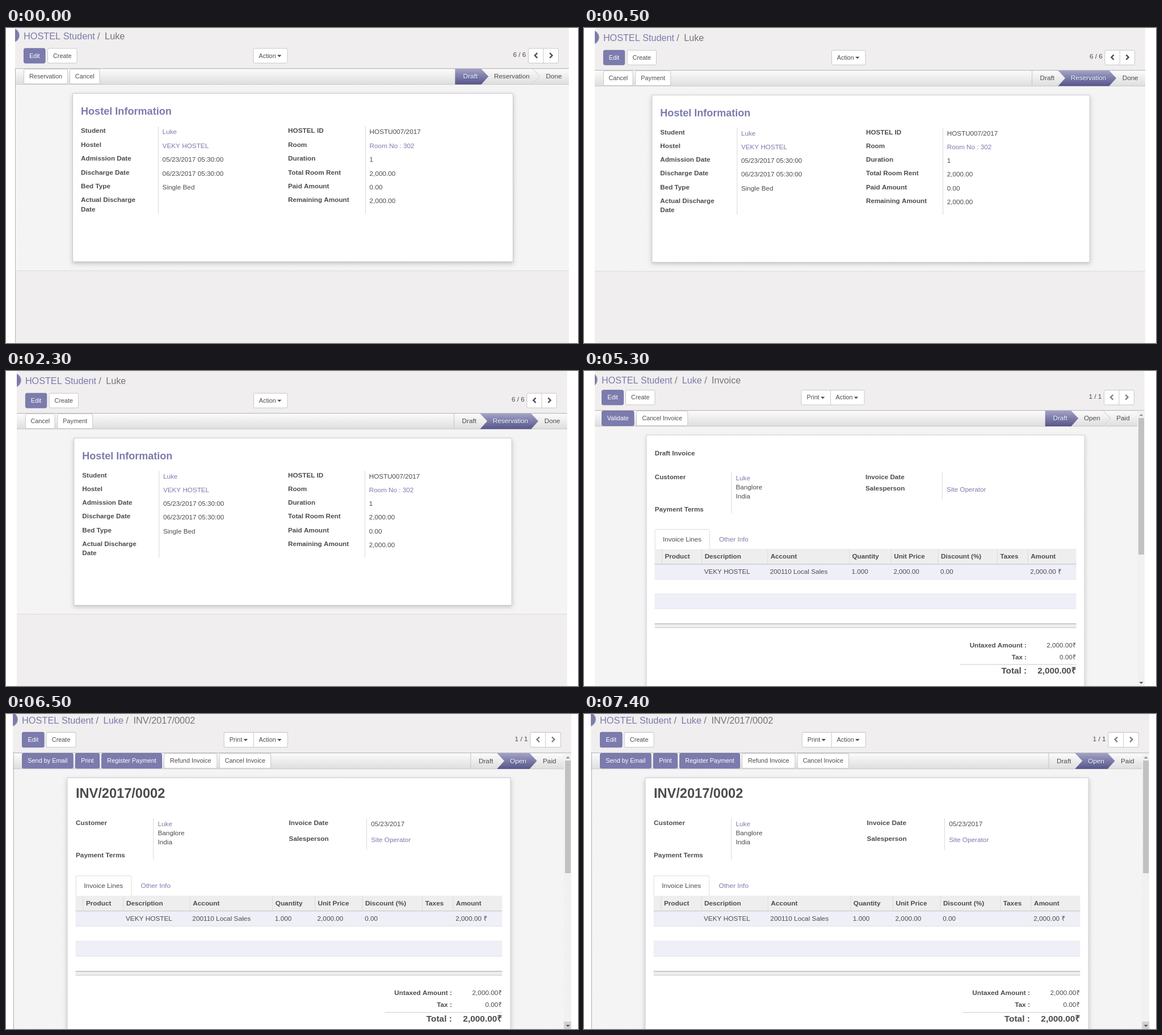
Write an HTML page with a canvas that moves like this. It is 1008 by 556 pixels and loops after 8 s.

```html
<!DOCTYPE html>
<html lang="en">
<head>
<meta charset="utf-8">
<title>Hostel reservation</title>
<style>
  html, body { margin: 0; width: 100%; height: 100%; overflow: hidden; background: #fff; }
  canvas { display: block; }
</style>
</head>
<body>
<canvas id="stage" width="1008" height="556"></canvas>
<script>
const ctx = document.getElementById('stage').getContext('2d');
const INK = '#4c4c4c', PURPLE = '#7c7bad', MUTED = '#777777', PAGE = '#f0eeee', RULE = '#cacaca';
const STUDENT = 'Luke', HOSTEL = 'VEKY HOSTEL', SELLER = 'Site Operator';
let zoom = 0.905; // scale of CSS font sizes on screen

// y is the middle of the capitals
function text(s, x, y, { size = 13, color = INK, bold = false, align = 'left' } = {}) {
  ctx.font = `${bold ? 'bold ' : ''}${size * zoom}px "Liberation Sans", Arial, sans-serif`;
  ctx.textAlign = align;
  ctx.fillStyle = color;
  ctx.fillText(s, x, y + size * zoom * 0.36 - 0.35);
  return ctx.measureText(s).width;
}
const label = (s, x, y) => text(s, x, y, { bold: true });
const link = (s, x, y) => text(s, x, y, { color: PURPLE });

function rect(x, y, w, h, color) {
  ctx.fillStyle = color;
  ctx.fillRect(x, y, w, h);
}

function path(points, close) {
  ctx.beginPath();
  points.forEach(([x, y]) => ctx.lineTo(x, y));
  if (close) ctx.closePath();
}

function stroke(points, color, width = 1) {
  path(points);
  ctx.strokeStyle = color;
  ctx.lineWidth = width;
  ctx.stroke();
}

function fill(points, color) {
  path(points, true);
  ctx.fillStyle = color;
  ctx.fill();
}

function box(x1, y1, x2, y2, color, border, radius = 2.5) {
  ctx.beginPath();
  ctx.roundRect(x1 + 0.5, y1 + 0.5, x2 - x1 - 1, y2 - y1 - 1, radius);
  ctx.fillStyle = color;
  ctx.fill();
  ctx.strokeStyle = border;
  ctx.lineWidth = 1;
  ctx.stroke();
}

function gradient(y, h, top, bottom) {
  const g = ctx.createLinearGradient(0, y, 0, y + h);
  g.addColorStop(0, top);
  g.addColorStop(1, bottom);
  return g;
}

function button(s, x1, x2, y, primary) {
  box(x1, y, x2, y + 27, primary ? PURPLE : '#fff', primary ? '#7371a6' : '#c8c8c8');
  text(s, (x1 + x2) / 2, y + 13.5, { size: 12, color: primary ? '#fff' : INK, align: 'center' });
}

function triangle(x, y, w, h, color) {
  fill([[x - w, y - h], [x + w, y - h], [x, y + h]], color);
}

function menu(s, x, y) {
  const w = text(s, x, y, { size: 12 });
  triangle(x + w + 6, y + 0.5, 3.7, 1.9, INK);
}

function pager(s, x, y, color) {
  text(s, x - 26.5, y + 11.7);
  box(x, y, x + 54, y + 27, '#fff', '#c8c8c8');
  stroke([[x + 27, y], [x + 27, y + 27]], '#c8c8c8');
  for (const [cx, d] of [[x + 14, 1], [x + 40.5, -1]]) {
    const cy = y + 13;
    stroke([[cx + 2.3 * d, cy - 4.3], [cx - 2 * d, cy], [cx + 2.3 * d, cy + 4.3]], color, 2.4);
  }
}

function crumbs(parts, y) {
  let x = 31;
  parts.forEach((s, i) => {
    const last = i === parts.length - 1;
    x += text(s, x, y, { size: 18, color: last ? MUTED : PURPLE }) + 4.3;
    if (!last) x += text('/', x, y, { size: 18, color: MUTED }) + 8.5;
  });
}

function makeHatch() {
  const tile = document.createElement('canvas');
  tile.width = tile.height = 4;
  const c = tile.getContext('2d');
  c.fillStyle = '#fbfbfb';
  c.fillRect(0, 0, 4, 4);
  c.fillStyle = '#eeeeee';
  for (let i = 0; i < 4; i++) {
    c.fillRect(i, i, 1, 1);
    c.fillRect(i, 3 - i, 1, 1);
  }
  const p = ctx.createPattern(tile, 'repeat');
  p.setTransform(new DOMMatrix().scale(0.9));
  return p;
}
const hatch = makeHatch();

// Page ground, collapse knob, header line, status bar and hatched area
function shell(left, right, bar, hatchEnd, titleY, edge) {
  ctx.beginPath();
  ctx.rect(left, -20, right - left, 620);
  ctx.clip();
  rect(left, -20, right - left, 620, PAGE);
  ctx.beginPath();
  ctx.arc(11, titleY - 1.5, 12.5, 0, 7);
  ctx.fillStyle = PURPLE;
  ctx.fill();
  ctx.strokeStyle = '#a9a8c6';
  ctx.lineWidth = 1;
  ctx.stroke();
  rect(left, bar + 28, right - left, hatchEnd - bar - 28, hatch);
  rect(left, bar, right - left, 27.5, gradient(bar, 27.5, '#fcfcfc', '#dedede'));
  rect(left, bar - 0.8, right - left, 1, '#afafb6');
  rect(left, bar + 27, right - left, 1, RULE);
  if (edge) rect(16, bar - 1, 1, 600, '#b4b4b8');
}

function status(items, edges, y, active) {
  const tip = 12.8, h = 27.7, mid = y + 13.5;
  if (active) stroke([[edges[0], y], [edges[0], y + h]], '#c4c4c4');
  items.forEach(([s, x], i) => {
    const a = edges[i], b = edges[i + 1], on = i === active;
    if (on) {
      const shape = [[a, y], [b, y], [b + tip, mid], [b, y + h], [a, y + h]];
      if (i) shape.push([a + tip, mid]);
      fill(shape, gradient(y, h, '#a3a2c6', '#57558a'));
    } else if (b && i + 1 !== active) {
      stroke([[b + 1, y], [b + tip + 1, mid], [b + 1, y + h]], '#fff');
      stroke([[b, y], [b + tip, mid], [b, y + h]], '#c0c0c0');
    }
    if (on) {
      ctx.shadowColor = '#2f4a8a';
      ctx.shadowBlur = 2;
      ctx.shadowOffsetY = 1;
    }
    text(s, x, mid, { color: on ? '#fff' : INK });
    ctx.shadowColor = 'transparent';
  });
}

function sheet(x1, y1, x2, y2) {
  ctx.shadowColor = 'rgba(0,0,0,.2)';
  ctx.shadowBlur = 7;
  ctx.shadowOffsetY = 3;
  rect(x1, y1, x2 - x1, y2 - y1, '#fff');
  ctx.shadowColor = 'transparent';
  box(x1, y1, x2, y2, '#fff', '#c8c8d3', 0);
}

const divider = (x, y1, y2) => rect(x - 0.5, y1, 1, y2 - y1, '#d9d9d9');

function reservation(booked) {
  zoom = 0.905;
  shell(16, 992, 72, 428, 14.5, !booked);
  crumbs(['HOSTEL Student', STUDENT], 14.5);
  button('Edit', 31, 69.5, 35.5, true);
  button('Create', 73, 125.6, 35.5);
  box(435.5, 35.5, 496.5, 62.5, '#fff', '#c8c8c8');
  menu('Action', 445.5, 49);
  pager('6 / 6', 920, 35.5, INK);
  if (booked) {
    button('Cancel', 31, 84, 72);
    button('Payment', 87.5, 151, 72);
  } else {
    button('Reservation', 31, 109, 72);
    button('Cancel', 112, 165.5, 72);
  }
  status([['Draft', 805.5], ['Reservation', 860], ['Done', 951.5]], [791.4, 837.4, 928], 72, booked ? 1 : 0);
  rect(16, 428, 976, 1, '#dcdcdc');
  sheet(117, 115, 894, 413);
  text('Hostel Information', 132, 147, { size: 20, color: PURPLE, bold: true });

  const columns = [
    [132, [['Student', STUDENT, 1], ['Hostel', HOSTEL, 1], ['Admission Date', '05/23/2017 05:30:00'],
      ['Discharge Date', '06/23/2017 05:30:00'], ['Bed Type', 'Single Bed'], ['Actual Discharge', '']]],
    [497, [['HOSTEL ID', 'HOSTU007/2017'], ['Room', 'Room No : 302', 1], ['Duration', '1'],
      ['Total Room Rent', '2,000.00'], ['Paid Amount', '0.00'], ['Remaining Amount', '2,000.00']]]
  ];
  for (const [x, rows] of columns) {
    divider(x + 136.4, 174, 328);
    rows.forEach(([name, value, isLink], i) => {
      const y = 181.5 + i * 24.4;
      label(name, x, y);
      (isLink ? link : text)(value, x + 143.6, y + 2);
    });
  }
  label('Date', 132, 320);
}

function lines(y) {
  // tabs
  rect(125, y, 742.5, 1, '#dddddd');
  box(124.5, y - 35.5, 222, y + 4, '#fff', '#dddddd', 3);
  text('Invoice Lines', 139, y - 17.5);
  link('Other Info', 238, y - 17.5);

  // table
  rect(124.5, y, 743, 27, '#eeeeee');
  const heads = [['Product', 142.5], ['Description', 212.7], ['Account', 328.7], ['Quantity', 472.5],
    ['Unit Price', 546.3], ['Discount (%)', 629], ['Taxes', 733.4], ['Amount', 787.2]];
  for (const [s, x] of heads) {
    rect(x - 5.5, y, 1, 26, '#dcdcdc');
    label(s, x, y + 13);
  }
  rect(124.5, y + 25.8, 743, 1.6, RULE);
  for (let i = 0; i < 4; i++) {
    const top = y + 27.2 + i * 26.2;
    rect(124.5, top, 743, 25.4, i % 2 ? '#fff' : '#efeff8');
    if (i < 3) rect(124.5, top + 25.4, 743, 1, '#dadadf');
  }
  const cells = [HOSTEL, '200110 Local Sales', '1.000', '2,000.00', '0.00', '', '2,000.00 ₹'];
  cells.forEach((s, i) => text(s, heads[i + 1][1] - 0.9, y + 40));
  rect(124.5, y + 131, 743, 8, '#eeeeee');
  rect(124.5, y + 131, 743, 1.6, '#c0c0c0');
  rect(124.5, y + 138, 743, 1, RULE);

  // totals
  const sums = [['Untaxed Amount :', '2,000.00₹', 169.5], ['Tax :', '0.00₹', 190.3]];
  for (const [s, v, dy] of sums) {
    text(s, 780, y + dy, { bold: true, align: 'right' });
    text(v, 867.3, y + dy, { align: 'right' });
  }
  rect(663, y + 203, 204.5, 1, RULE);
  const big = { size: 17, bold: true, align: 'right' };
  text('Total :', 780, y + 214, big);
  text('2,000.00₹', 867.3, y + 214, big);
}

function scrollbar(thumbEnd, end, hover) {
  rect(975, 70, 13, 530, '#f1f1f1');
  rect(977, 83, 10, thumbEnd - 83, '#c1c1c1');
  triangle(982, 77.5, 3.6, -1.8, '#8f8f8f');
  if (hover) rect(975, end - 13, 13, 13, '#d2d2d2');
  triangle(982, end - 5.5, 3.6, 1.8, '#505050');
}

function invoice(open) {
  zoom = 0.897;
  const d = open ? 4.5 : 0;
  const titleY = open ? 12.7 : 17;
  shell(open ? 15.2 : 19, 987.8, 70, 600, titleY, open);
  crumbs(['HOSTEL Student', STUDENT, open ? 'INV/2017/0002' : 'Invoice'], titleY);
  button('Edit', 31, 70, 33.3, true);
  button('Create', 73, 125.5, 33.3);
  box(382.5, 33.3, 494.5, 60.3, '#fff', '#c8c8c8');
  rect(434, 33.3, 1, 27, '#c8c8c8');
  menu('Print', 392.5, 46.8);
  menu('Action', 443.6, 46.8);
  pager('1 / 1', 916, 33.3, '#808080');
  if (open) {
    button('Send by Email', 31, 120.5, 70, true);
    button('Print', 123.7, 166.3, 70, true);
    button('Register Payment', 169.5, 275, 70, true);
    button('Refund Invoice', 278, 371.3, 70);
    button('Cancel Invoice', 374.5, 465, 70);
  } else {
    button('Validate', 31, 88.5, 70, true);
    button('Cancel Invoice', 92, 183.3, 70);
  }
  status([['Draft', 826.5], ['Open', 881], ['Paid', 938.3]], [812.7, 858.4, 915.2], 70, open ? 1 : 0);
  sheet(109.5, 112.5, 882.5, 620);
  if (open) text('INV/2017/0002', 124.8, 140.3, { size: 26, bold: true });
  else label('Draft Invoice', 124.8, 145);

  label('Customer', 124.8, 187 + d);
  link(STUDENT, 267.6, 189 + d);
  text('Banglore', 267.6, 205 + d);
  text('India', 267.6, 221.2 + d);
  label('Payment Terms', 124.8, 243.7 + d);
  divider(260, 179 + d, 251.5 + d);

  const salesY = open ? 219.3 : 206.7;
  label('Invoice Date', 496, 187 + d);
  if (open) text('05/23/2017', 639, 189 + d);
  label('Salesperson', 496, salesY);
  link(SELLER, 639, salesY + 2);
  divider(631.3, 179 + d, open ? 239 : 227);

  lines(314.5 + d);
  scrollbar(open ? 279.5 : 324, open ? 551.4 : 556, open);
}

// end time, screen, second state, scale, shift x, shift y
const scenes = [
  [500, reservation, false, 1, 0, 0],
  [3500, reservation, true, 0.9938, 3.1, 3.5],
  [6500, invoice, false, 1, 0, 0],
  [8000, invoice, true, 1.0117, -3.29, -1.82]
];

function draw(now) {
  const t = now % 8000;
  const [, screen, state, scale, dx, dy] = scenes.find(([end]) => t < end);
  ctx.setTransform(1, 0, 0, 1, 0, 0);
  rect(0, 0, 1008, 556, '#fff');
  ctx.save();
  ctx.setTransform(scale, 0, 0, scale, dx, dy);
  screen(state);
  ctx.restore();
}

function tick() {
  draw(performance.now());
  requestAnimationFrame(tick);
}
tick();
</script>
</body>
</html>
```
